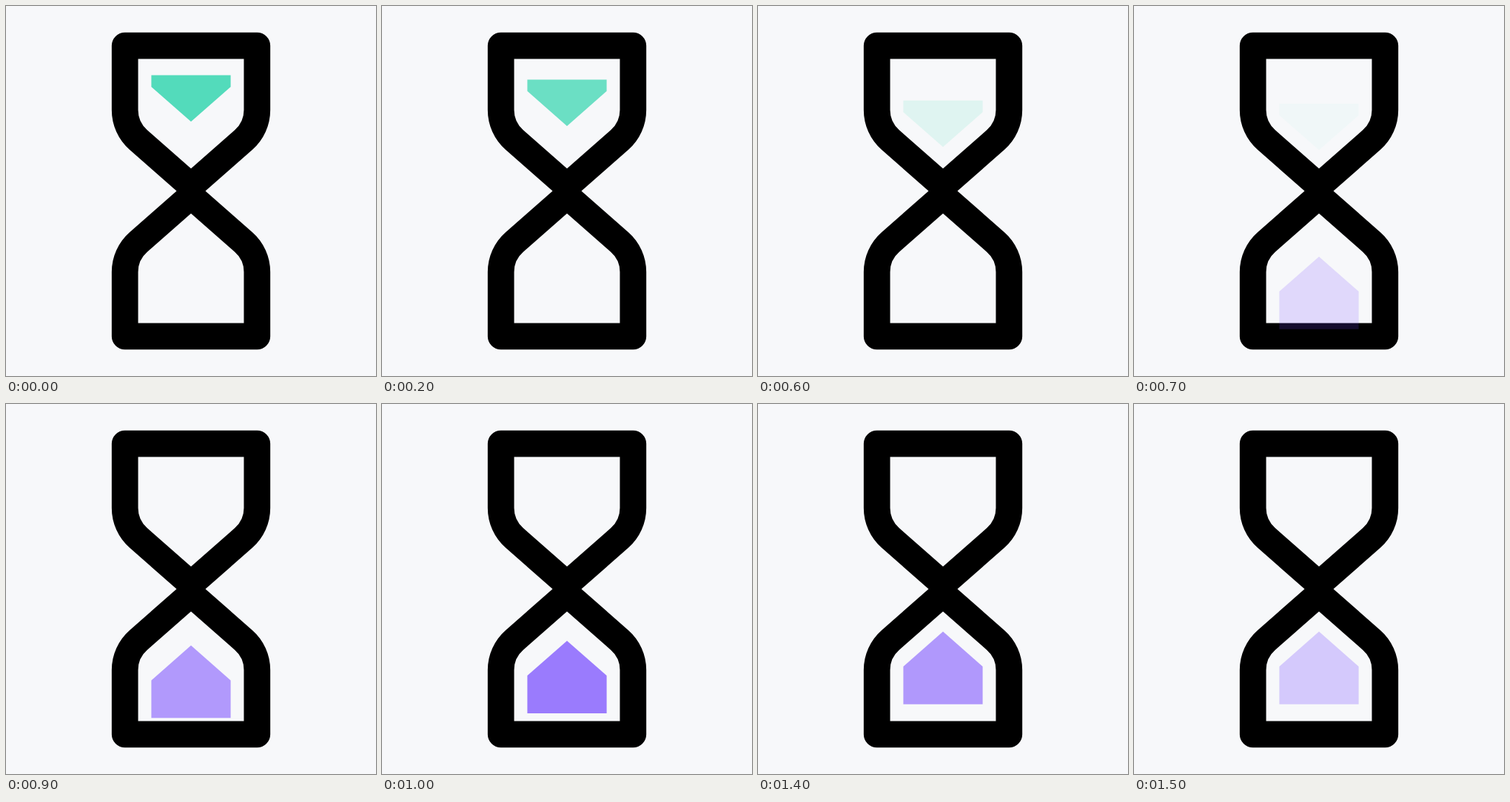
Write an HTML page that moves like this. It is 500x500 px and loops after 1600 ms.

```html
<!DOCTYPE html>
<html lang="en">
<head>
<meta charset="utf-8">
<title>Hourglass</title>
<style>
  html, body { margin: 0; height: 100%; overflow: hidden; background: #f7f8fa; }
  svg { display: block; width: 100vw; height: 100vh; }
</style>
</head>
<body>
<svg viewBox="0 0 500 500">
  <defs>
    <path id="chamber" d="M160.7 53.6H339.3V140.6A53.6 53.6 0 0 1 321.1 180.9L250 243.4L178.9 180.9A53.6 53.6 0 0 1 160.7 140.6Z"
      fill="none" stroke="#000" stroke-width="35.7" stroke-linejoin="round"/>
  </defs>
  <use href="#chamber"/>
  <use href="#chamber" transform="matrix(1 0 0 -1 0 500)"/>
  <path id="upper" fill="#53dbbb" d="M196.4 93.6H303.6V109.2L250 156.3L196.4 109.2Z"/>
  <path id="lower" fill="#7447ff" d="M196.4 405.7H303.6V354.8L250 307.6L196.4 354.8Z"/>
</svg>
<script>
  const LOOP = 1600, TRAVEL = 40;
  const upper = document.getElementById('upper');
  const lower = document.getElementById('lower');

  const progress = (t, from, to) => Math.min(1, Math.max(0, (t - from) / (to - from)));
  const ease = p => (1 - Math.cos(Math.PI * p)) / 2;

  function place(shape, dy, opacity) {
    shape.setAttribute('transform', `translate(0 ${dy})`);
    shape.setAttribute('opacity', opacity);
  }

  function draw(now) {
    const t = now % LOOP;
    const drain = ease(progress(t, 0, 800));
    const rise = ease(progress(t, 400, 1360));
    const fade = progress(t, 600, 1168) * (1 - progress(t, 1230, 1600));
    place(upper, TRAVEL * drain, 1 - drain);
    place(lower, TRAVEL * (1 - rise), fade);
  }

  const start = performance.now();
  function tick() {
    draw(performance.now() - start);
    requestAnimationFrame(tick);
  }
  tick();
</script>
</body>
</html>
```
